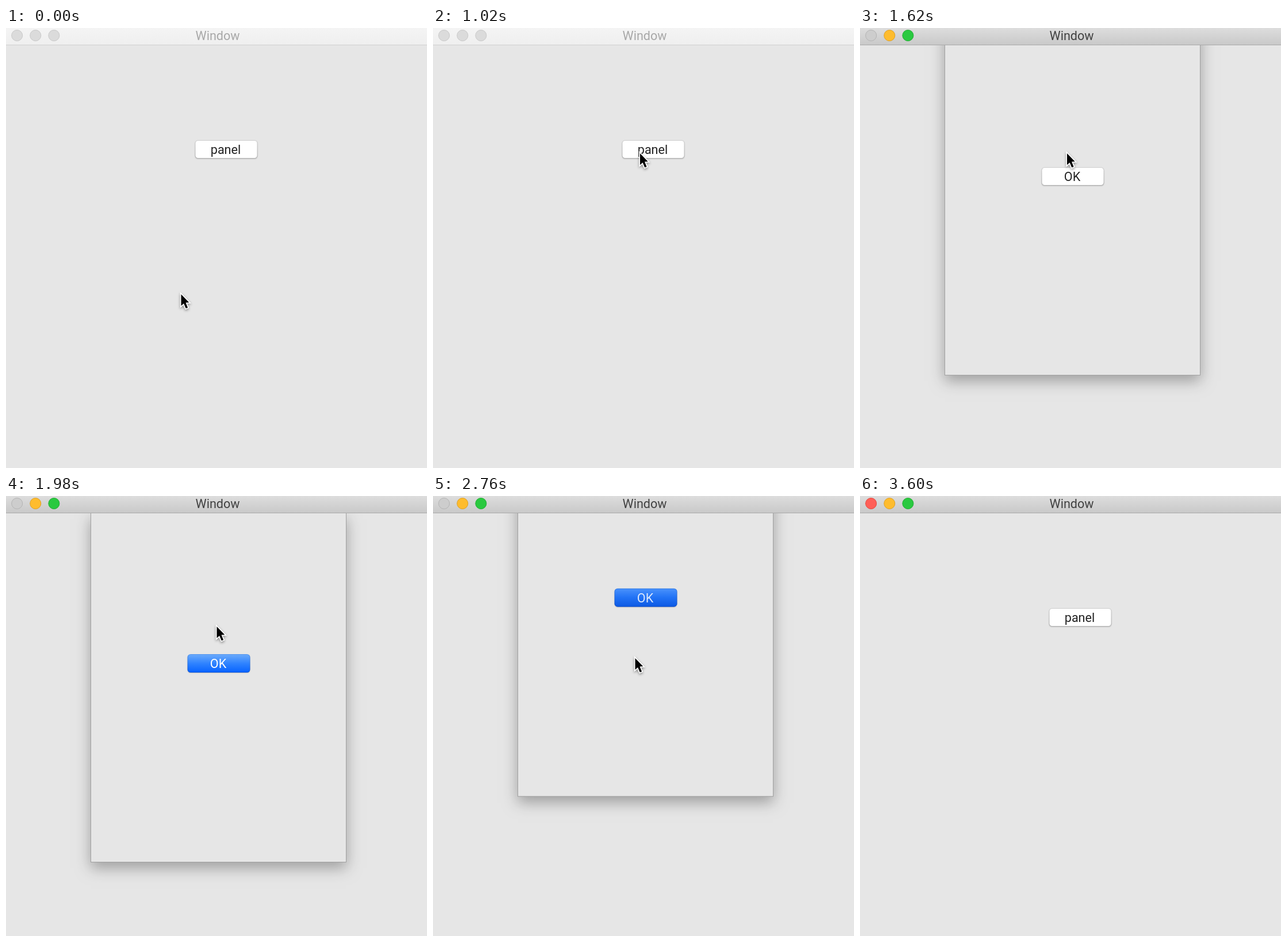
An HTML page with a canvas for the animation above (4440 ms loop, 732 by 765 pixels).

```html
<!DOCTYPE html>
<html lang="en">
<head>
<meta charset="utf-8">
<title>Window with panel</title>
<style>
  html, body { margin: 0; width: 100%; height: 100%; overflow: hidden; background: #e6e6e6; }
  canvas { display: block; width: 732px; height: 765px; }
</style>
</head>
<body>
<canvas id="stage" width="732" height="765"></canvas>
<script>
const ctx = document.getElementById('stage').getContext('2d');
const LOOP = 4440, STEP = 60;
const BAR = 30, SHEET_X = 147, SHEET_W = 444, SHEET_H = 607;
const FONT = '21.6px Roboto, Inter, sans-serif';

// Events in ms
const ACTIVE = 1080, PRESS = 1140, RELEASE = 1320;
const SHOW = 1370, KEY = 1740;
const CONFIRM = 2520, HIDE = 2676, CLOSED = 3000, LEAVE = 3600;
const SLIDE = 294;

// Cursor tip: time, x, y
const TRAIL = [
  [0, 304.5, 463], [120, 314, 445], [300, 352, 370], [420, 379, 300],
  [540, 383, 249], [720, 374, 232], [960, 360, 218], [1920, 360, 218],
  [2040, 373, 236], [2160, 376, 262], [2280, 353, 284], [2400, 351.5, 282],
  [3000, 351.5, 282], [3120, 318, 304], [3240, 225, 370], [3360, 140, 455],
  [3450, 122, 530], [3540, 174, 606]
];

const ARROW = [[0, 0], [0, 20], [4.6, 16], [8.2, 24.6], [11.6, 23.2], [8, 14.6], [13.8, 14.2]];

const BUTTON = {
  plain:   { fill: ['#ffffff', '#ffffff'], edge: ['#cfcfcf', '#b4b4b4'], text: '#222222' },
  primary: { fill: ['#69a9fb', '#2f83ff', '#0964ff'], edge: ['#4f94ee', '#0a55dc'], text: '#ffffff' },
  pressed: { fill: ['#4790fc', '#2172f5', '#0d5ae4'], edge: ['#347de8', '#0a4cc8'], text: '#dce8fc' }
};

const ease = u => 0.5 - 0.5 * Math.cos(Math.PI * Math.min(1, Math.max(0, u)));

function gradient(y0, y1, colors) {
  const g = ctx.createLinearGradient(0, y0, 0, y1);
  colors.forEach((c, i) => g.addColorStop(i / (colors.length - 1), c));
  return g;
}

function label(text, x, y, color) {
  ctx.font = FONT;
  ctx.textAlign = 'center';
  ctx.textBaseline = 'alphabetic';
  ctx.fillStyle = color;
  ctx.fillText(text, x, y);
}

function roundRect(x, y, w, h, r) {
  ctx.beginPath();
  ctx.moveTo(x + r, y);
  ctx.arcTo(x + w, y, x + w, y + h, r);
  ctx.arcTo(x + w, y + h, x, y + h, r);
  ctx.arcTo(x, y + h, x, y, r);
  ctx.arcTo(x, y, x + w, y, r);
  ctx.closePath();
}

function button(text, x, y, style) {
  const s = BUTTON[style];
  ctx.save();
  ctx.shadowColor = 'rgba(0,0,0,0.16)';
  ctx.shadowBlur = 1.5;
  ctx.shadowOffsetY = 1;
  roundRect(x, y, 109, 32, 5.5);
  ctx.fillStyle = gradient(y, y + 32, s.edge);
  ctx.fill();
  ctx.restore();
  roundRect(x + 1, y + 1, 107, 30, 4.5);
  ctx.fillStyle = gradient(y + 1, y + 31, s.fill);
  ctx.fill();
  label(text, x + 53.5, y + 24, s.text);
}

function light(x, fill, edge) {
  ctx.beginPath();
  ctx.arc(x, 13, 9.5, 0, Math.PI * 2);
  ctx.fillStyle = fill;
  ctx.fill();
  ctx.strokeStyle = edge;
  ctx.lineWidth = 1;
  ctx.stroke();
}

function titleBar(active, hasSheet) {
  ctx.fillStyle = gradient(0, BAR - 1, active ? ['#dddddd', '#c9c9c9'] : ['#f4f4f4', '#efefef']);
  ctx.fillRect(0, 0, 732, BAR - 1);
  ctx.fillStyle = active ? '#a9a9a9' : '#d0d0d0';
  ctx.fillRect(0, BAR - 1, 732, 1);
  const off = ['#dbdbdb', '#c8c8c8'];
  const red = hasSheet ? ['#cdcdcd', '#b4b4b4'] : ['#ff5f57', '#e2483f'];
  light(19.2, ...(active ? red : off));
  light(51.3, ...(active ? ['#febc2e', '#dfa023'] : off));
  light(83.4, ...(active ? ['#2ac940', '#1fad30'] : off));
  label('Window', 368, 21, active ? '#414141' : '#a8a8a8');
}

function sheet(shown, style) {
  const top = BAR - SHEET_H * (1 - shown);
  const bottom = top + SHEET_H;
  ctx.save();
  ctx.beginPath();
  ctx.rect(0, BAR, 732, 735);
  ctx.clip();
  ctx.save();
  ctx.shadowColor = 'rgba(0,0,0,0.31)';
  ctx.shadowBlur = 24;
  ctx.shadowOffsetY = 10;
  ctx.fillStyle = '#a0a0a0';
  ctx.fillRect(SHEET_X, top, SHEET_W + 1, SHEET_H);
  ctx.restore();
  ctx.fillStyle = '#e6e6e6';
  ctx.fillRect(SHEET_X + 1, top, SHEET_W - 1, SHEET_H - 1);
  button('OK', 315.5, bottom - 362, style);
  ctx.restore();
}

function cursorAt(t) {
  const i = TRAIL.findIndex(p => p[0] > t);
  if (i < 0) return TRAIL[TRAIL.length - 1].slice(1);
  const [t0, x0, y0] = TRAIL[i - 1], [t1, x1, y1] = TRAIL[i];
  const u = (t - t0) / (t1 - t0);
  return [x0 + (x1 - x0) * u, y0 + (y1 - y0) * u];
}

function cursor(x, y) {
  ctx.save();
  ctx.translate(x, y);
  ctx.beginPath();
  ARROW.forEach(([px, py]) => ctx.lineTo(px, py));
  ctx.closePath();
  ctx.lineJoin = 'miter';
  ctx.miterLimit = 3;
  ctx.lineWidth = 3.4;
  ctx.strokeStyle = '#ffffff';
  ctx.shadowColor = 'rgba(0,0,0,0.4)';
  ctx.shadowBlur = 4;
  ctx.shadowOffsetY = 2;
  ctx.stroke();
  ctx.shadowColor = 'transparent';
  ctx.fillStyle = '#000000';
  ctx.fill();
  ctx.restore();
}

function draw(t) {
  ctx.fillStyle = '#e6e6e6';
  ctx.fillRect(0, 0, 732, 765);
  button('panel', 328.5, 195, t >= PRESS && t < RELEASE ? 'pressed' : 'plain');
  const shown = ease((t - SHOW) / SLIDE) - ease((t - HIDE) / SLIDE);
  if (shown > 0) sheet(shown, t < KEY ? 'plain' : t < CONFIRM ? 'primary' : 'pressed');
  titleBar(t >= ACTIVE, t >= SHOW && t < CLOSED);
  if (t < LEAVE) cursor(...cursorAt(t));
}

const start = performance.now();
function tick() {
  const t = (performance.now() - start) % LOOP;
  draw(Math.floor(t / STEP) * STEP);
  requestAnimationFrame(tick);
}
tick();
</script>
</body>
</html>
```
